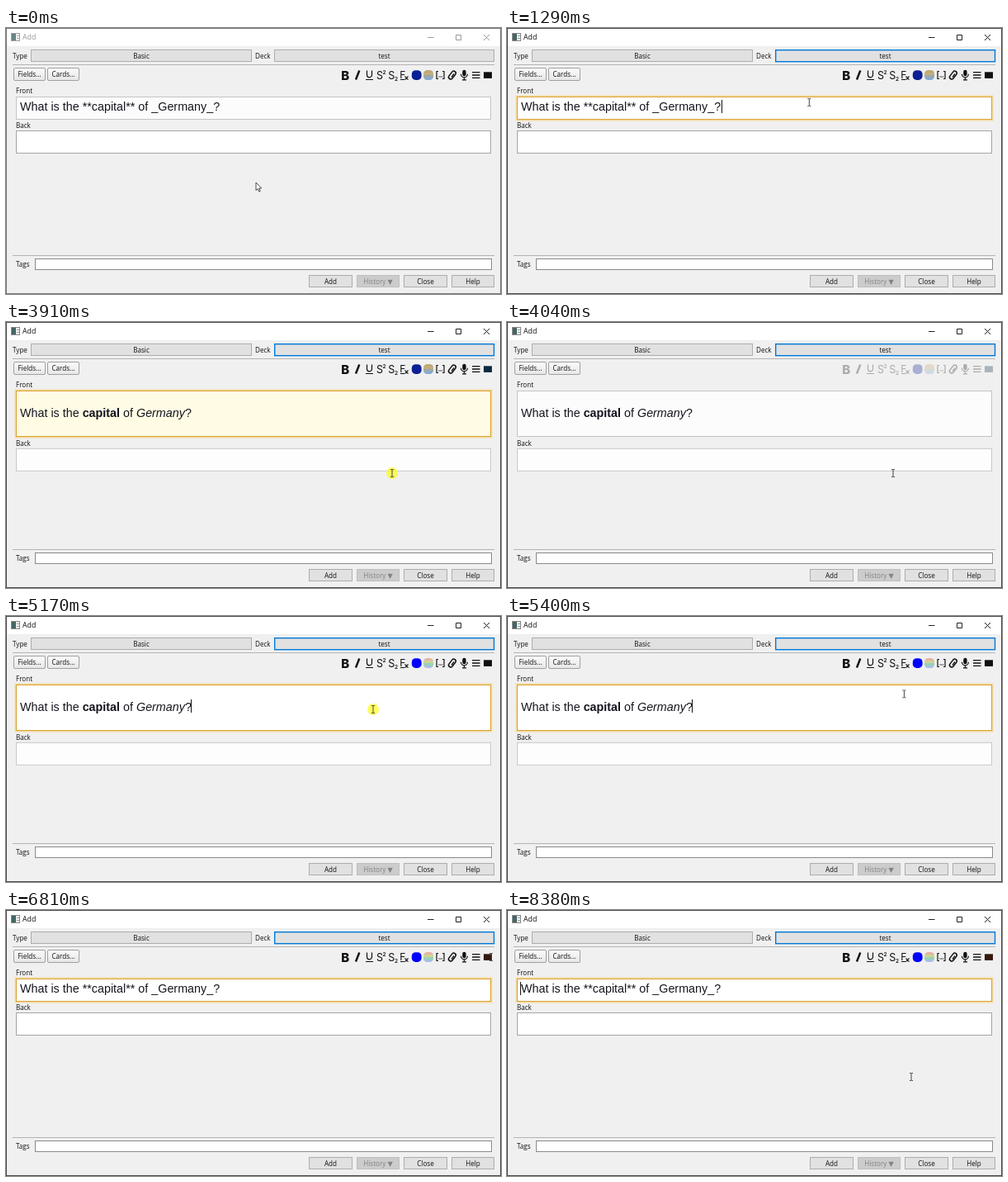
Recreate the animation shown at these times as an HTML page. Size 600 by 322 pixels, loop 8560 ms.

```html
<!DOCTYPE html>
<html lang="en">
<head>
<meta charset="utf-8">
<title>Add</title>
<style>
html, body { margin: 0; width: 100%; height: 100%; overflow: hidden; background: #f0f0f0; }
svg { display: block; width: 100%; height: 100%; }
.ui { font: 8.1px "Open Sans", "Noto Sans", "DejaVu Sans", sans-serif; fill: #111; }
.mid { text-anchor: middle; }
.field { font: 14.33px "Liberation Sans", Arial, sans-serif; fill: #15151f; white-space: pre; }
.glyph { font-family: Inter, Roboto, sans-serif; fill: #111; }
.line { fill: none; stroke: #111; }
</style>
</head>
<body>
<svg id="stage" viewBox="0 0 600 322" xmlns="http://www.w3.org/2000/svg">
  <defs>
    <linearGradient id="shade" x2="0" y2="1">
      <stop stop-color="#fbfbfb"/><stop offset="1" stop-color="#e6e6e6"/>
    </linearGradient>
    <clipPath id="disc"><rect x="506" y="51" width="12" height="12" rx="4.5"/></clipPath>
  </defs>
  <rect width="600" height="322" fill="#f0f0f0"/>

  <rect width="600" height="22" fill="#fff"/>
  <g id="appIcon">
    <rect x="6.5" y="6.5" width="10" height="9" fill="#f4f4f4" stroke="#888"/>
    <rect x="7" y="7" width="5" height="8" fill="#466"/>
    <path d="M13 9.5h3M13 12.5h3" stroke="#999"/>
  </g>
  <text id="title" class="ui" x="20" y="14.3" style="font-size:8.8px">Add</text>
  <path id="winButtons" fill="none" d="M511 11.5h7.5M545.5 8.5h6v6h-6zM579 8l7 7M586 8l-7 7"/>

  <path d="M8 44.5H592M8 275.5H592" stroke="#b4b4b4"/>
  <g id="widgets"></g>
  <rect id="deckFocus" x="325.7" y="26.7" width="265.8" height="14" fill="none" stroke="#0078d7" stroke-width="1.4"/>

  <g id="tools">
    <text class="glyph" x="406.3" y="62.5" font-size="15" font-weight="800">B</text>
    <path class="line" d="M428.3 51.5L424 62.5" stroke-width="2.4"/>
    <path class="line" d="M437.5 51.5v5.3a3 3 0 0 0 6 0v-5.3M436 62.5h9" stroke-width="1.2"/>
    <g class="glyph">
      <text x="449" y="62" font-size="12.5">S</text><text x="456.6" y="56" font-size="6.5" font-weight="600">2</text>
      <text x="463.3" y="62" font-size="12.5">S</text><text x="471" y="63.5" font-size="6.5" font-weight="600">2</text>
      <text x="477.2" y="61" font-size="12">F</text>
    </g>
    <path class="line" d="M478 62.5h5M483.5 58.5l4 4.2M487.5 58.5l-4 4.2" stroke-width="1.1"/>
    <rect id="ink" x="491.8" y="51.2" width="11.8" height="11.8" rx="4.7"/>
    <g id="bands" clip-path="url(#disc)"></g>
    <path class="line" d="M524 52.5h-2v9h2M529 52.5h2v9h-2" stroke-width="1.2"/>
    <path class="line" d="M524.3 59h4.8" stroke-width="1.2" stroke-dasharray="1.2 .6"/>
    <rect class="line" x="538.4" y="51.6" width="5" height="11" rx="2.5" stroke-width="1.5" transform="rotate(38 541 57)"/>
    <path class="line" d="M540 59.5l3-4" stroke-width="1.3"/>
    <rect x="553.2" y="50.8" width="4.4" height="7.4" rx="2.2" fill="#111"/>
    <path class="line" d="M551.4 55.8a4 4 0 0 0 8 0M555.4 60v3M553 62.8h5" stroke-width="1.2"/>
    <path class="line" d="M565 53.7h9.5M565 57h9.5M565 60.3h9.5" stroke-width="1.3"/>
    <rect id="mark" x="579" y="53.3" width="10" height="7.6"/>
  </g>

  <text class="ui" x="12" y="79.3">Front</text>
  <rect id="glow" x="11.5" y="82.5" width="577" fill="none" stroke="#f3d9a0" stroke-width="2"/>
  <rect id="front" x="12.5" y="83.5" width="575"/>
  <text id="raw" class="field" x="17" y="100">What is the **capital** of _Germany_?</text>
  <text id="rich" class="field" x="17" y="114.5">What is the <tspan font-weight="bold">capital</tspan> of <tspan font-style="italic">Germany</tspan>?</text>
  <path id="caret" d="M.5 0v16" stroke="#111"/>
  <g id="backGroup">
    <text class="ui" x="12" y="121">Back</text>
    <rect id="back" x="12.5" y="124.5" width="575" height="27"/>
  </g>

  <g id="mouse">
    <circle id="click" r="7" fill="#ff0" opacity=".62"/>
    <path id="arrow" d="M0 0v9.6l2.2-2 1.6 3.5 1.5-.7-1.6-3.4h2.9z" fill="#fff" stroke="#222" stroke-width=".8"/>
    <path id="beam" d="M-2 -4.5h1.4L0 -4l.6-.5H2M0 -4v8M-2 4.5h1.4L0 4l.6.5H2" fill="none" stroke="#333" stroke-width=".9"/>
  </g>
  <rect id="edge" x=".5" y=".5" width="599" height="321" fill="none"/>
</svg>
<script>
const LOOP = 8560;
const ACTIVATE = 850, RENDER = 2720, BLUR = 3980, REFOCUS = 5170, RESTORE = 6490;
const BLINK = 530;

const $ = id => document.getElementById(id);
const set = (id, attrs) => {
  for (const k in attrs) $(id).setAttribute(k, attrs[k]);
};
const show = (id, on) => set(id, { visibility: on ? 'visible' : 'hidden' });
const within = (t, spans) => spans.some(([a, b]) => t >= a && t < b);

const label = (x, y, text, cls = '', fill = '#111') =>
  `<text class="ui ${cls}" x="${x}" y="${y}" style="fill:${fill}">${text}</text>`;

const box = (x, y, w, h, fill, stroke, rx = 0) =>
  `<rect x="${x + .5}" y="${y + .5}" width="${w}" height="${h}" rx="${rx}" fill="${fill}" stroke="${stroke}"/>`;

function button(x, y, w, text, { h = 14, fill = '#e1e1e1', stroke = '#adadad', ink, rx } = {}) {
  return box(x, y, w, h, fill, stroke, rx) + label(x + w / 2 + .5, y + 11, text, 'mid', ink);
}

const soft = { h: 15, fill: 'url(#shade)', stroke: '#a0a0a0', rx: 1.5 };
$('widgets').innerHTML = [
  label(8, 37, 'Type'), button(30, 26, 267, 'Basic'),
  label(302, 37, 'Deck'), button(325, 26, 266, 'test'),
  button(9, 48, 38, 'Fields...', soft), button(50, 48, 38, 'Cards...', soft),
  label(12, 289.3, 'Tags'), box(35, 279, 553, 13, '#fff', '#8a8a8a'),
  button(367, 299, 52, 'Add'),
  button(425, 299, 51, 'History ▼', { fill: '#ccc', stroke: '#bfbfbf', ink: '#838383' }),
  button(482, 299, 52, 'Close'), button(540, 299, 51, 'Help')
].join('');

$('bands').innerHTML = [0, 1, 2, 3].map(i =>
  `<rect x="506" y="${51 + i * 3}" width="12" height="3.1"/>`).join('');
const bands = [...$('bands').children];
const DULL = ['#bfa873', '#c2ae7c', '#9aa9ac', '#86acd0'];
const FRESH = ['#e6b3a2', '#cdd494', '#98d2b4', '#a9bfe4'];

// Pointer stops: time, x, y
const PATH = [
  [0, 303, 187], [70, 303, 187], [850, 278, 102], [1100, 278, 102],
  [1290, 366, 90], [1950, 581, 63], [2020, 584, 60], [2200, 584, 60],
  [2450, 587, 56], [2720, 587, 56], [3040, 468, 183], [4850, 468, 183],
  [5170, 445, 113], [5300, 445, 113], [5680, 582, 43], [5730, 582, 42],
  [6250, 588, 57], [7310, 588, 57], [7440, 587, 58], [7620, 587, 58],
  [8000, 490, 202], [LOOP, 490, 202]
];
const CLICKS = [[790, 920], [2530, RENDER], [3910, 4040], [REFOCUS, 5230], [6380, RESTORE]];

function pointer(t) {
  const i = PATH.findIndex(p => p[0] > t);
  const [t0, x0, y0] = PATH[i - 1], [t1, x1, y1] = PATH[i];
  const k = (t - t0) / (t1 - t0);
  return [x0 + (x1 - x0) * k, y0 + (y1 - y0) * k];
}

const blinkOn = (t, from) => Math.floor((t - from) / BLINK) % 2 === 0;

function caretAt(t) {
  if (t < ACTIVATE) return null;
  if (t < RENDER) return blinkOn(t, ACTIVATE) ? [260, 87] : null;
  if (t < 3910) return blinkOn(t, 2480) ? [16, 101] : null;
  if (t < REFOCUS) return null;
  if (t < RESTORE) return blinkOn(t, REFOCUS) ? [224, 101] : null;
  return blinkOn(t, 6260) ? [16, 87] : null;
}

function draw(t) {
  const active = t >= ACTIVATE;
  const rich = t >= RENDER && t < RESTORE;
  const away = t >= BLUR && t < REFOCUS;
  const focused = active && !away;
  const fresh = t >= REFOCUS;

  $('title').style.fill = active ? '#111' : '#999';
  set('winButtons', { stroke: active ? '#222' : '#999' });
  set('appIcon', { opacity: active ? 1 : .8 });
  set('edge', { stroke: active ? '#4a4a4a' : '#777' });
  show('deckFocus', active);

  set('tools', { opacity: away ? .3 : 1 });
  set('ink', { fill: fresh ? '#0000ff' : '#0c1f94' });
  bands.forEach((b, i) => b.setAttribute('fill', (fresh ? FRESH : DULL)[i]));
  set('mark', { fill: t >= RESTORE ? '#35180f' : rich && !fresh ? '#0b2a42' : '#111' });

  const tint = within(t, [[3910, BLUR]]) ? '#fffbe4'
    : within(t, [[6420, RESTORE]]) ? '#fffee6' : focused ? '#fff' : '#fcfcfc';
  set('front', { height: rich ? 55 : 27, fill: tint, stroke: focused ? '#dba338' : '#c4c4c4' });
  set('glow', { height: rich ? 57 : 29 });
  show('glow', focused);
  show('raw', !rich);
  show('rich', rich);
  set('backGroup', { transform: `translate(0 ${rich ? 28.8 : 0})` });
  set('back', { fill: rich ? '#fdfdfd' : '#fff', stroke: rich ? '#c8c8c8' : '#a6a6a6' });

  const caret = caretAt(t);
  show('caret', caret);
  if (caret) set('caret', { transform: `translate(${caret})` });

  const [x, y] = pointer(t);
  const arrow = t < ACTIVATE && y > 152;
  set('mouse', { transform: `translate(${x} ${y})` });
  show('arrow', arrow);
  show('beam', !arrow);
  show('click', within(t, CLICKS));
}

const start = performance.now();
function tick() {
  draw((performance.now() - start) % LOOP);
  requestAnimationFrame(tick);
}
tick();
</script>
</body>
</html>
```
